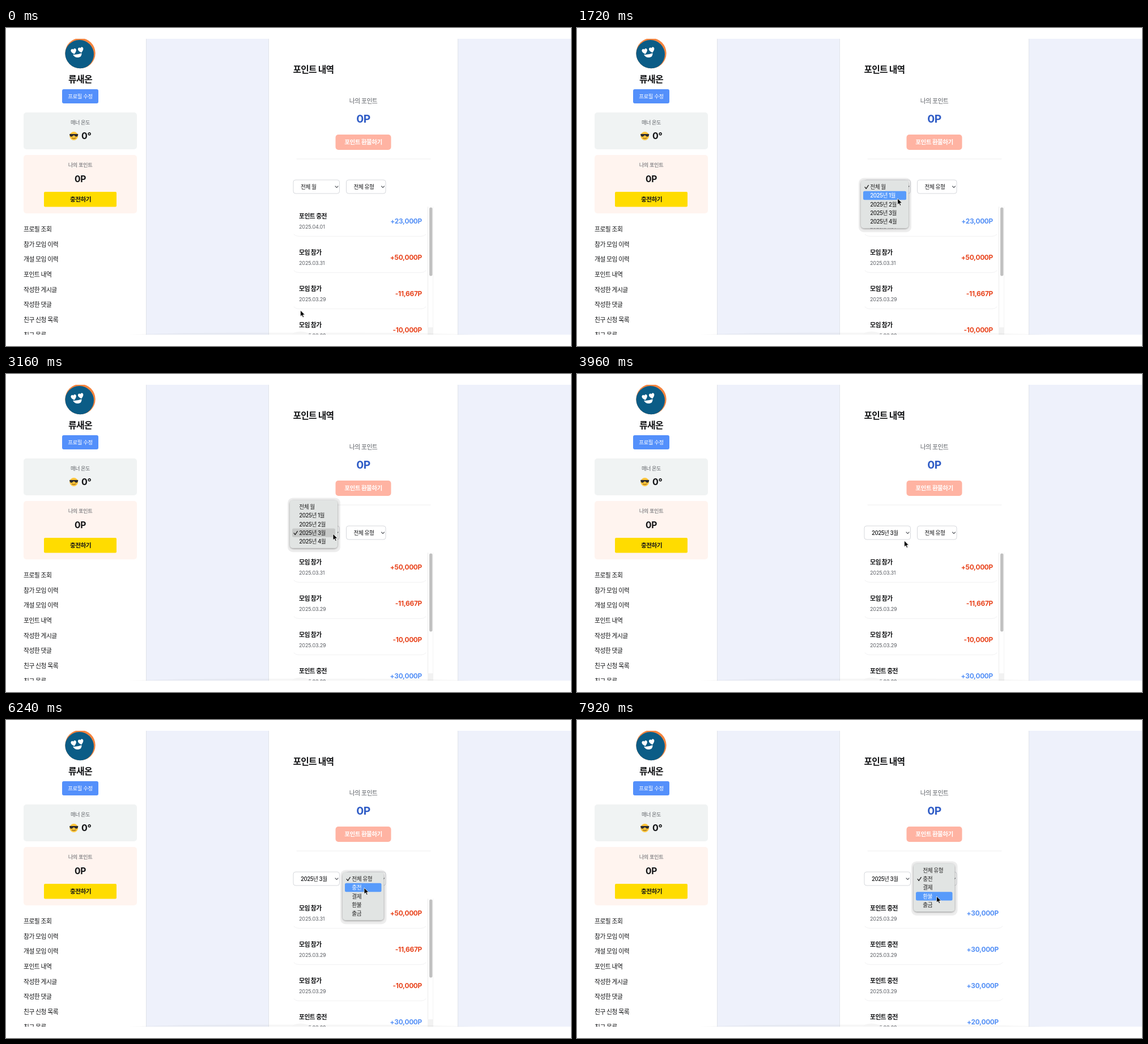
These frames come from a looping animation (997 px wide and 561 px high, 8 s). An HTML page:

```html
<!DOCTYPE html>
<html lang="ko">
<head>
<meta charset="utf-8">
<style>
  html, body { margin: 0; width: 100%; height: 100%; overflow: hidden; background: #fff; }
  svg { display: block; width: 997px; height: 561px; }
  text { font-family: Inter, "Noto Sans CJK KR", "Noto Sans CJK", "Noto Sans CJK JP", sans-serif; white-space: pre; }
</style>
</head>
<body>
<svg viewBox="0 0 997 561">
  <defs>
    <clipPath id="screen"><rect y="19" width="997" height="522"/></clipPath>
    <clipPath id="face"><circle cx="131" cy="44.5" r="26.7"/></clipPath>
    <filter id="soft" x="-20%" y="-20%" width="140%" height="140%"><feGaussianBlur stdDeviation="1.6"/></filter>
    <path id="heart" d="M0 5C-7 0-5-4.5-2-4.5-.7-4.5 0-3 0-3S.7-4.5 2-4.5C5-4.5 7 0 0 5z"/>
  </defs>
  <g clip-path="url(#screen)">
    <g id="page"></g>
    <g id="live"></g>
    <path d="M215 541Q300 537.5 420 537.5H620Q745 537.5 830 541z" fill="#000" fill-opacity=".035"/>
    <ellipse cx="520" cy="541" rx="15" ry="5.5" fill="#f4f4f4"/>
    <g id="menu"></g>
    <path id="cursor" d="M0 0V11L2.6 8.7 4.3 12.6 6.2 11.8 4.5 8H8z" fill="#000" stroke="#fff" stroke-width=".8"/>
  </g>
</svg>
<script>
const LOOP = 8000, ROW = 15.35;
const BLUE = '#5490f6', RED = '#e8431c', INK = '#131416', GRAY = '#5d6066';
const $ = id => document.getElementById(id);

// y is the vertical middle of the line
function text(x, y, str, size, { weight = 500, fill = INK, anchor = 'start' } = {}) {
  const spacing = /[가-힣]/.test(str) ? -.05 : -.02;
  return `<text x="${x}" y="${y + size * .36}" font-size="${size}" font-weight="${weight}" fill="${fill}"
    text-anchor="${anchor}" letter-spacing="${spacing * size}">${str}</text>`;
}
const mid = (x, y, str, size, weight, fill) => text(x, y, str, size, { weight, fill, anchor: 'middle' });
const rect = (x, y, w, h, fill, r = 0, extra = '') =>
  `<rect x="${x}" y="${y}" width="${w}" height="${h}" rx="${r}" fill="${fill}" ${extra}/>`;
const line = (d, color, width = 1) =>
  `<path d="${d}" fill="none" stroke="${color}" stroke-width="${width}" stroke-linecap="round" stroke-linejoin="round"/>`;

const links = ['프로필 조회', '참가 모임 이력', '개설 모임 이력', '포인트 내역',
  '작성한 게시글', '작성한 댓글', '친구 신청 목록', '친구 목록'];

$('page').innerHTML = `
  ${rect(247, 19, 217, 522, '#eef1fb')}${rect(797, 19, 200, 522, '#eef1fb')}
  ${[247, 463, 797].map(x => rect(x, 19, 1, 522, '#e0e3ea')).join('')}
  <g clip-path="url(#face)">
    ${rect(100, 15, 60, 60, '#f4843f')}
    <circle cx="129.5" cy="46.5" r="25.5" fill="#0b5c86"/>
    <g fill="#fff">
      <use href="#heart" transform="translate(119.5 41) rotate(-12)"/>
      <use href="#heart" transform="translate(132 38.5) rotate(-12)"/>
      <path d="M118 46.8Q126 47.5 133.5 44.2Q134 51 127.5 52Q121 52.6 118 46.8z"/>
    </g>
  </g>
  ${mid(131, 90, '류새온', 16, 700)}
  ${rect(99, 108, 64, 25, '#5490fb', 3)}${mid(131, 120.5, '프로필 수정', 9.5, 500, '#fff')}
  ${rect(31, 149, 200, 65, '#f0f3f3', 5)}${mid(131, 166.5, '매너 온도', 9.2, 400, GRAY)}
  <circle cx="119.7" cy="190.5" r="7.4" fill="#fcc63c"/>
  <path d="M112 187H127.4L126.6 190.5Q123.5 193.5 120.6 189.5H118.8Q116 193.5 112.8 190.5z" fill="#2b2b30"/>
  ${line('M116.5 194.2Q120 196.3 123 194', '#7b4a12')}
  ${text(133, 190.5, '0°', 16, { weight: 700 })}
  ${rect(31, 224, 200, 103, '#fff4ef', 5)}${mid(131, 241.5, '나의 포인트', 9.3, 400, GRAY)}
  ${mid(131, 266, '0P', 15.6, 700)}
  ${rect(67, 289, 128, 26.5, '#ffdc00', 2)}${mid(131.5, 302, '충전하기', 10.7, 700)}
  ${links.map((s, i) => text(31, 355 + i * 26.67, s, 10.8)).join('')}
  ${text(506.5, 73, '포인트 내역', 15.8, { weight: 700 })}
  ${mid(630.5, 129, '나의 포인트', 10.8, 400, GRAY)}
  ${mid(630.5, 160, '0P', 19.3, 700, '#2f5cc6')}
  ${rect(581.5, 188, 98, 27, '#ffb3a2', 5)}${mid(630.5, 201.5, '포인트 환불하기', 10.6, 700, '#fff')}
  ${line('M513 231H749', '#eeeeef')}`;

const months = ['전체 월', '2025년 1월', '2025년 2월', '2025년 3월', '2025년 4월'];
const types = ['전체 유형', '충전', '결제', '환불', '출금'];

const join = (date, sum) => ({ title: '모임 참가', date, sum, color: RED });
const charge = (date, sum) => ({ title: '포인트 충전', date, sum, color: BLUE });
const march = [join('03.31', '+50,000P'), join('03.29', '-11,667P'),
  join('03.29', '-10,000P'), charge('03.29', '+30,000P')];
const april = [charge('04.01', '+23,000P')];
const charges = ['+30,000P', '+30,000P', '+30,000P', '+20,000P'].map(s => charge('03.29', s));

// thumb is the scrollbar length, 0 for a list that fits
const views = [
  { at: 0, month: 0, type: 0, rows: [...april, ...march.slice(0, 3)], thumb: 121 },
  { at: 2520, month: 3, type: 0, rows: march, thumb: 138 },
  { at: 4000, month: 4, type: 0, rows: april, thumb: 0 },
  { at: 5780, month: 3, type: 0, rows: march, thumb: 138 },
  { at: 6840, month: 3, type: 1, rows: charges, thumb: 0 },
];

const monthBox = { items: months, x: 501, w: 84 };
const typeBox = { items: types, x: 594, w: 72.5 };
const menus = [
  { open: 840, close: 2240, box: monthBox, checked: 0 },
  { open: 3120, close: 3640, box: monthBox, checked: 3 },
  { open: 5200, close: 5480, box: monthBox, checked: 4 },
  { open: 6120, close: 6480, box: typeBox, checked: 0 },
  { open: 7320, close: LOOP, box: typeBox, checked: 1 },
];
const FADE = 200;

// time, x, y
const path = [
  [0, 519.5, 498], [500, 519.5, 498], [640, 565, 285], [1360, 565, 285], [2160, 566.5, 322],
  [2480, 566.5, 322], [3040, 577, 282], [3280, 577, 282], [3560, 577.5, 294], [4320, 577.5, 294],
  [5120, 573.5, 268.5], [5320, 573.5, 268.5], [5400, 573, 266], [5740, 573, 266], [6040, 632, 284],
  [6140, 632, 284], [6220, 632, 296], [6900, 632, 296], [7200, 632.5, 284], [7660, 632.5, 284],
  [7900, 634.5, 311], [LOOP, 634.5, 311],
];

function cursorAt(t) {
  const i = path.findIndex(p => p[0] > t);
  const [t0, x0, y0] = path[i - 1], [t1, x1, y1] = path[i];
  const u = (t - t0) / (t1 - t0), e = u * u * (3 - 2 * u);
  return [x0 + (x1 - x0) * e, y0 + (y1 - y0) * e];
}

function select(x, w, label) {
  return rect(x + .5, 268, w - 1, 24, '#fff', 4, 'stroke="#d6d8dc"')
    + text(x + 13.5, 280.3, label, 9.7)
    + line(`M${x + w - 8} 279L${x + w - 5.5} 281.6L${x + w - 3} 279`, '#55585e', 1.1);
}

function drawView({ month, type, rows, thumb }) {
  const right = thumb ? 742 : 752;
  const list = rows.map((r, i) => {
    const y = 332 + i * 64;
    return text(517, y + .5, r.title, 10.8, { weight: 700 })
      + text(517, y + 18.3, '2025.' + r.date, 9.1, { weight: 400, fill: GRAY })
      + text(right - 8, y + 8.5, r.sum, 11.8, { weight: 700, fill: r.color, anchor: 'end' })
      + line(`M508 ${y + 32}Q511 ${y + 35.5} 517 ${y + 35.5}H${right - 10}Q${right - 4} ${y + 35.5} ${right - 1} ${y + 32}`, '#f1f1f2');
  }).join('');
  const bar = thumb && rect(744, 315, 1, 226, '#ececec') + rect(753, 315, 1, 226, '#f3f3f3')
    + rect(744, 528, 10, 13, '#f2f2f2') + rect(747, 316.5, 5.4, thumb, '#c1c1c1', 2.7);
  return select(506.5, 82.5, months[month]) + select(600, 70.5, types[type]) + list + (bar || '');
}

function drawMenu({ open, close, box, checked }, t, [cx, cy]) {
  const { items, x, w } = box;
  const top = 268.5 - checked * ROW, h = items.length * ROW + 8;
  const [ox, oy] = cursorAt(open);
  const hover = Math.floor((cy - top - 4) / ROW);
  const moved = cx !== ox || cy !== oy;
  const rows = items.map((s, i) => {
    const y = top + 4 + i * ROW, c = y + ROW / 2;
    const lit = i === hover && moved && i !== checked;
    const still = i === hover && i === checked;
    return (lit || still ? rect(x + 4, y, w - 8, ROW, lit ? '#589bfb' : '#c7c9c8', 2.5) : '')
      + (i === checked ? line(`M${x + 7} ${c + .5}l2.3 2.8 4-6`, '#222', 1.3) : '')
      + text(x + 16.3, c + .2, s, 9.7, { fill: lit ? '#fff' : '#222' });
  }).join('');
  const opacity = Math.min(1, 1 - (t - close) / FADE);
  return `<g opacity="${opacity}">
    ${rect(x - 4, top - 4, w + 9, h + 11, '#000', 9, 'fill-opacity=".07"')}
    ${rect(x, top + 1, w, h, '#000', 6, 'fill-opacity=".4" filter="url(#soft)"')}
    ${rect(x, top, w, h, '#e1e4e3', 5)}${rows}</g>`;
}

let shown;
function frame(now) {
  const t = now % LOOP, pos = cursorAt(t);
  const view = views.findLast(v => v.at <= t);
  if (view !== shown) $('live').innerHTML = drawView(shown = view);
  const menu = menus.find(m => t >= m.open && t < m.close + FADE);
  $('menu').innerHTML = menu ? drawMenu(menu, t, pos) : '';
  $('cursor').setAttribute('transform', `translate(${pos})`);
  requestAnimationFrame(frame);
}
const start = performance.now();
requestAnimationFrame(now => frame(Math.max(0, now - start)));
</script>
</body>
</html>
```
